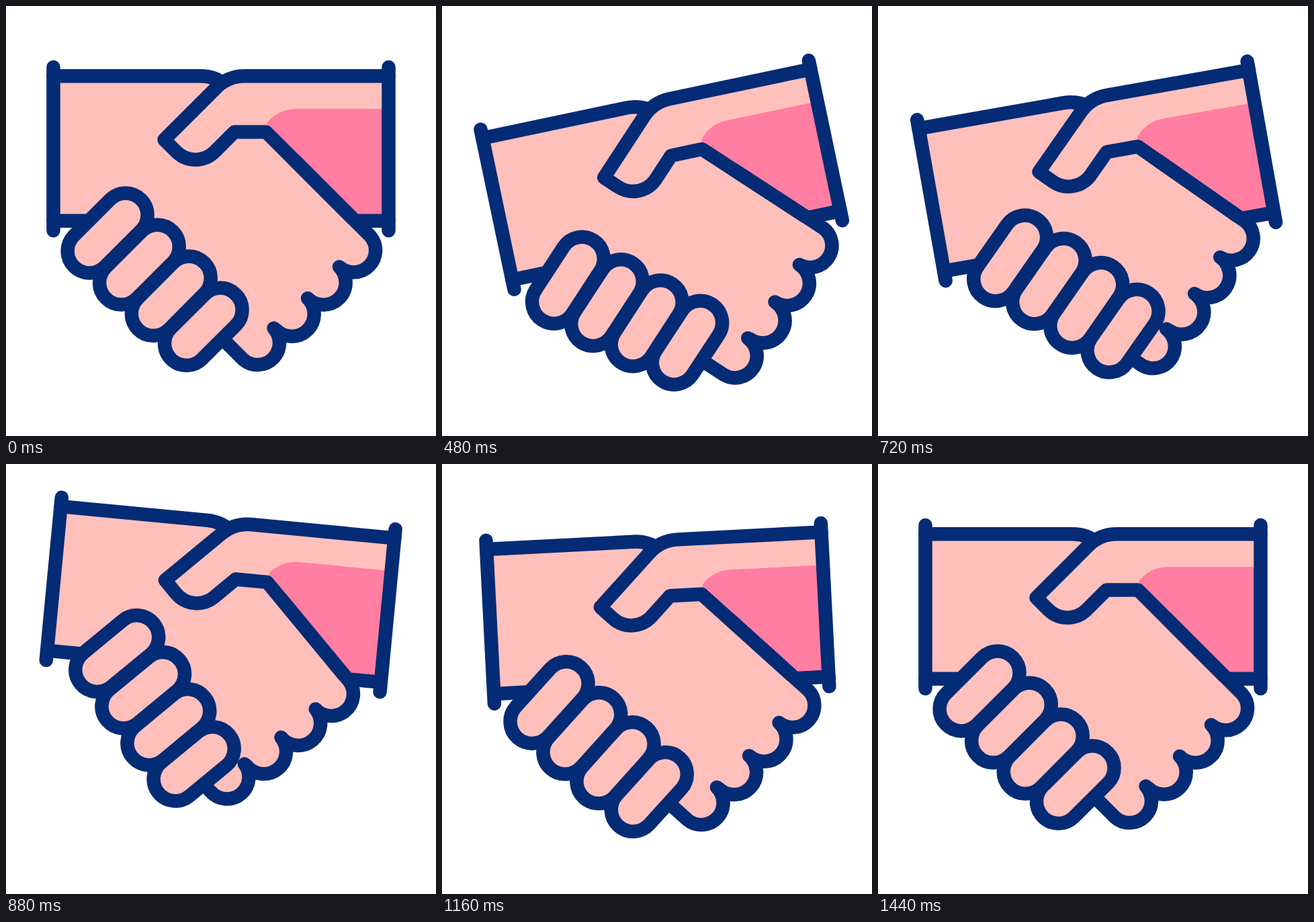
An HTML page that plays this animation: 640 px wide and 640 px high, repeating every 2 s.

```html
<!DOCTYPE html>
<html lang="en">
<head>
<meta charset="utf-8">
<title>Handshake</title>
<style>
  html, body { margin: 0; width: 100%; height: 100%; overflow: hidden; background: #fff; }
  svg { display: block; width: 100vw; height: 100vh; }
  .line, .skin { stroke: #042b75; stroke-width: 20.5; stroke-linecap: round; stroke-linejoin: round; }
  .line { fill: none; }
  .skin, .flat { fill: #ffc0bb; }
  .shade { fill: #ff7ea1; }
</style>
</head>
<body>
<svg viewBox="0 0 640 640">
  <g id="shake">
    <!-- right sleeve -->
    <path class="flat" d="M355 104.3H569.5V320H522L387 187.5L320 160Z"/>
    <path class="shade" d="M569.5 153.3H432A55 55 0 0 0 393 169L380 182L387 190L518 320H569.5Z"/>
    <path class="line" d="M524 319.8H569.5"/>
    <!-- left arm and palm -->
    <path class="flat" d="M70.5 104.3H290L330 120L387 187.5L440 240L320 470L150 330L124 319.8H70.5Z"/>
    <path class="line" d="M70.5 104.3H290A60 60 0 0 1 328 118M70.5 319.8H140"/>
    <!-- far fingers -->
    <g id="far">
      <path class="flat" d="M430 230L542 342L496 388L449 435L400 480L352.5 525.5L306 479Z"/>
      <path class="skin" d="M430 230.3L542 342.2A32.6 32.6 0 0 1 496 388.2A32.6 32.6 0 0 1 449 435A32.6 32.6 0 0 1 402 482L398.5 479.5A32.6 32.6 0 0 1 352.5 525.6L306 479.1"/>
    </g>
    <!-- thumb -->
    <path class="flat" d="M400 104.3H355A60 60 0 0 0 312.6 122L235.5 199L253.3 216.8A40.6 40.6 0 0 0 310.7 216.8L340 187.5H387Z"/>
    <path class="line" d="M569.5 104.3H355A60 60 0 0 0 312.6 122L235.5 199L253.3 216.8A40.6 40.6 0 0 0 310.7 216.8L340 187.5H387L515 315.4"/>
    <g id="near"></g>
    <path class="line" d="M70.5 91V334.3M569.5 91V334.3"/>
  </g>
</svg>
<script>
const LOOP = 2000, STEP = 40;
const PIVOT = "510 200";
const SWING = [[291, 0], [602, -18], [908, 6], [1173, -3], [1440, 0]];

// knuckle x, y and fingertip x, y
const FINGERS = [
  [178, 311, 124.2, 364.8],
  [225.2, 358.4, 171.7, 411.9],
  [272.2, 405, 219.4, 458.1],
  [319, 452.2, 268.6, 502.4]
];
const R = 32.6, K = R * Math.SQRT1_2;

const $ = id => document.getElementById(id);
const ease = p => p * p * (3 - 2 * p);

function track(keys, t) {
  if (t <= keys[0][0]) return keys[0][1];
  for (let i = 1; i < keys.length; i++) {
    const [t0, a] = keys[i - 1], [t1, b] = keys[i];
    if (t < t1) return a + (b - a) * ease((t - t0) / (t1 - t0));
  }
  return keys[keys.length - 1][1];
}

// out and back, both ways eased
const slide = (start, half, size, t) =>
  track([[start, 0], [start + half, size], [start + 2 * half, 0]], t) * Math.SQRT1_2;

const fingers = FINGERS.map(([x, y, u, v]) => {
  const path = document.createElementNS("http://www.w3.org/2000/svg", "path");
  path.setAttribute("class", "skin");
  path.setAttribute("d",
    `M${x - K} ${y - K}A${R} ${R} 0 0 1 ${x + K} ${y + K}` +
    `L${u + K} ${v + K}A${R} ${R} 0 0 1 ${u - K} ${v - K}Z`);
  return $("near").appendChild(path);
});

const move = (el, x, y) => el.setAttribute("transform", `translate(${x} ${y})`);

function draw(t) {
  $("shake").setAttribute("transform", `rotate(${track(SWING, t)} ${PIVOT})`);
  const back = slide(377, 455, 28.5, t);
  move($("far"), -back, -back);
  fingers.forEach((el, i) => {
    const d = slide(291 + 53 * (3 - i), 378, 35, t);
    move(el, d, -d);
  });
}

const begin = performance.now();
function tick(now) {
  const t = Math.max(0, now - begin) % LOOP;
  draw(Math.floor((t + 3) / STEP) * STEP % LOOP);
  requestAnimationFrame(tick);
}
draw(0);
requestAnimationFrame(tick);
</script>
</body>
</html>
```
